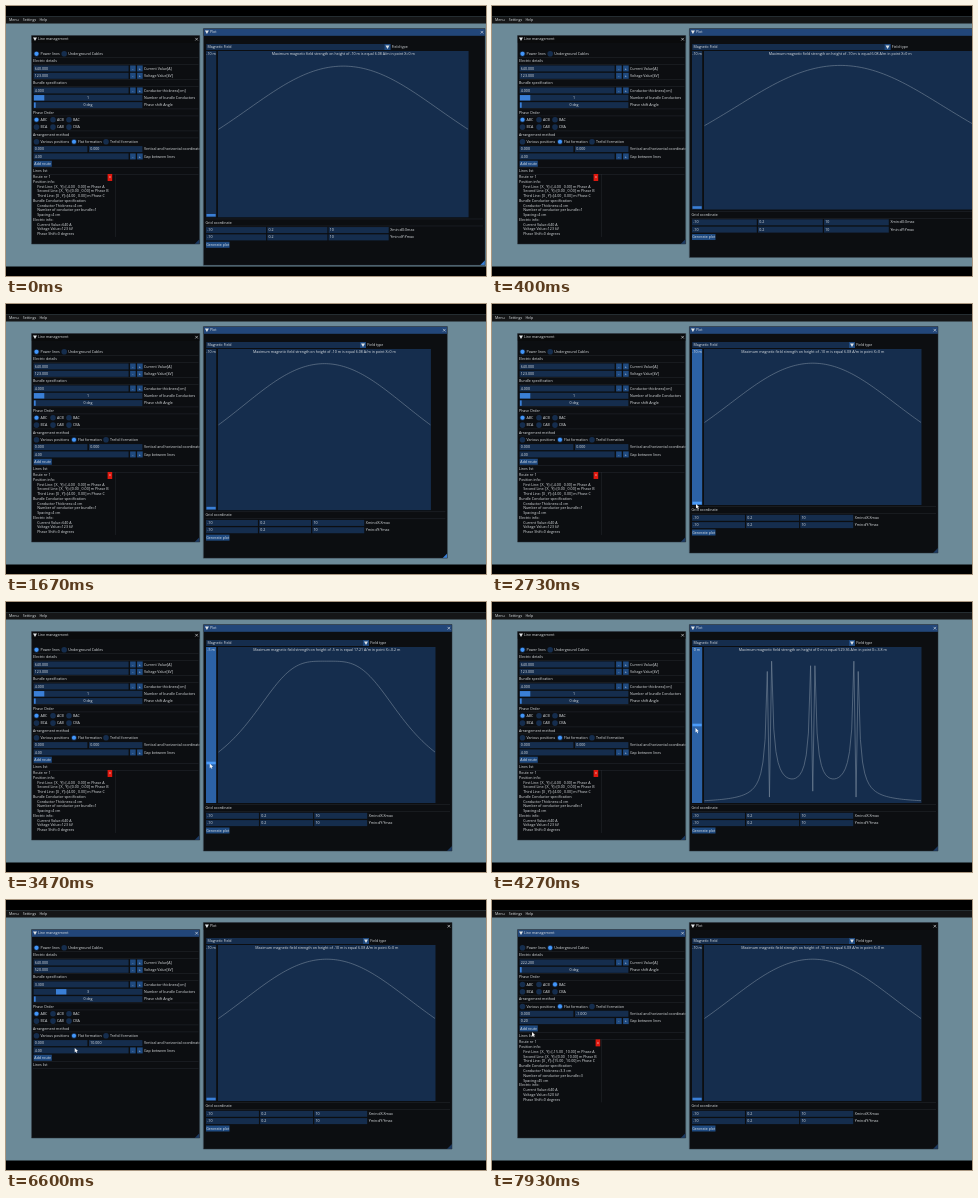
These frames come from a looping animation (480x270 px, 8 s). An HTML page with a canvas:

```html
<!DOCTYPE html>
<html lang="en">
<head>
<meta charset="utf-8">
<title>Line management and field plot</title>
<style>
  html, body { margin: 0; width: 100%; height: 100%; overflow: hidden; background: #000; }
  canvas { display: block; width: 480px; height: 270px; }
</style>
</head>
<body>
<canvas id="stage"></canvas>
<script>
const LOOP = 8000;
const canvas = document.getElementById('stage');
const ctx = canvas.getContext('2d');
const ratio = window.devicePixelRatio || 1;
canvas.width = 480 * ratio;
canvas.height = 270 * ratio;

const C = {
  back: '#6c8a98', menu: '#151617', win: '#0c0e11', edge: '#262c34',
  title: '#0a0b0c', titleOn: '#224679', frame: '#152d4d', button: '#1f4a80',
  hover: '#3276c4', grab: '#3a7fd6', line: '#2b3037', text: '#dfe3e6', curve: '#78889b'
};

// [time, ...values]
const RESIZE = [[0, 479, 259.3], [200, 493, 255], [400, 501, 251.5], [600, 450, 255],
  [800, 390.4, 259.3], [1050, 386, 257], [1700, 444, 254], [2000, 462, 252], [2400, 446, 249]];
const POINTER = [[2400, 446, 249], [2680, 204, 200], [2900, 204, 200], [4000, 203.5, 126],
  [4400, 203.5, 126], [4700, 204, 24], [5000, 204, 214], [5080, 204, 214], [5400, 106, 174],
  [5560, 105, 173], [5700, 60, 71], [5850, 60, 71], [5980, 45, 85], [6120, 45, 85],
  [6230, 52, 92], [6330, 52, 92], [6430, 98, 143], [6540, 98, 143], [6640, 50, 151],
  [6750, 50, 151], [6850, 38, 159], [6980, 38, 159], [7120, 59, 49], [7220, 59, 49],
  [7320, 50, 64], [7420, 50, 64], [7500, 64, 86], [7570, 64, 86], [7640, 98, 115],
  [7710, 98, 115], [7770, 50, 123], [7830, 50, 123], [7920, 40, 132]];

function track(keys, t) {
  if (t <= keys[0][0]) return keys[0].slice(1);
  for (let i = 1; i < keys.length; i++) {
    const [a, b] = [keys[i - 1], keys[i]];
    if (t <= b[0]) {
      const u = (t - a[0]) / (b[0] - a[0]);
      return a.slice(1).map((v, k) => v + (b[k + 1] - v) * u);
    }
  }
  return keys[keys.length - 1].slice(1);
}
const pick = (t, first, ...steps) => steps.reduce((v, [at, next]) => t >= at ? next : v, first);

function rect(x, y, w, h, color) {
  ctx.fillStyle = color;
  ctx.fillRect(x, y, w, h);
}
function text(s, x, y, align = 'left') {
  ctx.fillStyle = C.text;
  ctx.textAlign = align;
  ctx.fillText(s, x, y + 0.15);
}
function shape(color, ...pts) {
  ctx.fillStyle = color;
  ctx.beginPath();
  pts.forEach(p => ctx.lineTo(...p));
  ctx.closePath();
  ctx.fill();
}
function stroke(color, width, ...pts) {
  ctx.strokeStyle = color;
  ctx.lineWidth = width;
  ctx.beginPath();
  pts.forEach(p => ctx.lineTo(...p));
  ctx.stroke();
}
function arrow(x, y) {
  shape(C.text, [x - 2, y - 1.5], [x + 2, y - 1.5], [x, y + 1.9]);
}
function cross(x, y) {
  stroke(C.text, 0.6, [x - 1.3, y - 1.3], [x + 1.3, y + 1.3]);
  stroke(C.text, 0.6, [x + 1.3, y - 1.3], [x - 1.3, y + 1.3]);
}
function openWindow(name, x, y, r, b, active) {
  ctx.save();
  ctx.beginPath();
  ctx.rect(x, y, r - x, b - y);
  ctx.clip();
  rect(x, y, r - x, b - y, C.win);
  rect(x, y, r - x, 7.3, active ? C.titleOn : C.title);
  arrow(x + 3.5, y + 3.6);
  text(name, x + 6.6, y + 3.7);
  cross(r - 3.1, y + 3.7);
}
function closeWindow(x, y, r, b, grip) {
  shape(grip, [r, b], [r - 5, b], [r, b - 5]);
  ctx.restore();
  ctx.strokeStyle = C.edge;
  ctx.lineWidth = 0.5;
  ctx.strokeRect(x, y, r - x, b - y);
}
function heading(s, x, y, r) {
  rect(x, y - 3.7, r - x, 0.4, C.line);
  text(s, x, y);
  rect(x, y + 3.3, r - x, 0.4, C.line);
}
function field(s, x, y, w) {
  rect(x, y - 3, w, 6, C.frame);
  text(s, x + 1.2, y);
}
function button(s, x, y, w, mouse) {
  const over = mouse && mouse[0] >= x && mouse[0] <= x + w && Math.abs(mouse[1] - y) < 3.4;
  rect(x, y - 3, w, 6, over ? C.hover : C.button);
  text(s, x + w / 2, y, 'center');
}
function stepper(value, label, y) {
  field(value, 27.6, y, 95);
  button('-', 124.1, y, 5.6);
  button('+', 131.1, y, 5.6);
  text(label, 138, y);
}
function slider(value, label, y, grabX, grabW) {
  rect(27.6, y - 3, 108.8, 6, C.frame);
  rect(grabX, y - 2.7, grabW, 5.4, C.grab);
  text(value, 82, y, 'center');
  text(label, 138, y);
}
function radios(y, chosen, ...items) {
  for (const [label, x] of items) {
    const dot = (r, color) => {
      ctx.fillStyle = color;
      ctx.beginPath();
      ctx.arc(x, y, r, 0, 7);
      ctx.fill();
    };
    dot(2.8, C.frame);
    if (label === chosen) dot(2.1, '#4296fa');
    text(label, x + 4, y);
  }
}

function routeList(y, gap, height, size, count, spacing, voltage, deleteX) {
  const place = v => `[X , Y]=[${v.toFixed(2)} , ${height}] m Phase `;
  const lines = ['Route nr 1', 'Position info:',
    '  First Line: ' + place(-gap) + 'A', '  Second Line: ' + place(0) + 'B',
    '  Third Line: ' + place(gap) + 'C', 'Bundle Conductor specification:',
    `  Conductor Thickness=${size} cm`, `  Number of conductor per bundle=${count}`,
    `  Spacing=${spacing} cm`, 'Electric info:', '  Current Value=640 A',
    `  Voltage Value=${voltage} kV`, '  Phase Shift=0 degrees'];
  lines.forEach((s, i) => text(s.trim(), s[0] === ' ' ? 31.2 : 27, y + i * 4.76));
  rect(deleteX, y - 3, 4.6, 7, '#e0190f');
  text('x', deleteX + 2.3, y + 0.4, 'center');
  rect(109.3, y - 3, 0.4, 63, C.line);
}

function linePanel(t, mouse) {
  const box = [25.5, 29.5, 193.7, 238];
  openWindow('Line management', ...box, t >= 5400);
  const cables = t >= 7180;
  let y = 47.8 - 7.33;
  const next = () => y += 7.33;
  const head = s => heading(s, 27, next(), 192.5);

  radios(next(), cables ? 'Underground Cables' : 'Power lines',
    ['Power lines', 30.5], ['Underground Cables', 58.2]);
  head('Electric details');
  if (cables) {
    stepper(pick(t, '640.000', [7400, '222.200']), 'Current Value[A]', next());
  } else {
    stepper('640.000', 'Current Value[A]', next());
    stepper(pick(t, '123.000', [5800, '520.000']), 'Voltage Value[kV]', next());
    head('Bundle specification');
    stepper(pick(t, '4.000', [6080, '3.300']), 'Conductor thickness[cm]', next());
    const many = t >= 6280;
    slider(many ? '3' : '1', 'Number of bundle Conductors', next(), many ? 50 : 27.9, 10.4);
  }
  slider('0 deg', 'Phase shift Angle', next(), 27.9, 1.8);

  head('Phase Order');
  const order = cables && t >= 7540 ? 'BAC' : 'ABC';
  radios(next(), order, ['ABC', 30.5], ['ACB', 47], ['BAC', 63]);
  radios(next(), order, ['BCA', 30.5], ['CAB', 47], ['CBA', 63]);
  head('Arrangement method');
  radios(next(), 'Flat formation', ['Various positions', 30.5],
    ['Flat formation', 68], ['Trefoil formation', 100]);
  next();
  field('0.000', 27.6, y, 53.8);
  field(cables ? pick(t, '0.000', [7690, '-1.000']) : pick(t, '0.000', [6500, '10.000']), 83, y, 53.4);
  text('Vertical and horizontal coordinates', 138, y);
  stepper(cables ? pick(t, '4.00', [7810, '0.20']) : pick(t, '4.00', [6720, '15.00']),
    'Gap between lines', next());
  button('Add route', 27.6, next(), 18.2, mouse);
  head('Lines list');

  if (t < 5540) routeList(y + 5.9, 4, '0.00', '4', 1, 4, 123, 101.6);
  else if (t >= 6920) routeList(y + 6.6, 15, '10.00', '3.3', 3, 45, 520, 103.6);
  closeWindow(...box, '#1b3a63');
}

// Flat three-phase line with conductors at -4, 0 and 4 m, 120 degrees apart.
// The peak over time is the long half-axis of the field ellipse.
function fieldStrength(x, h) {
  let xr = 0, xi = 0, yr = 0, yi = 0;
  for (const k of [-1, 0, 1]) {
    const dx = x - 4 * k, rr = dx * dx + h * h;
    if (rr < 1e-6) continue;
    const re = Math.cos(k * 2 * Math.PI / 3) / rr, im = Math.sin(k * 2 * Math.PI / 3) / rr;
    xr += h * re;
    xi += h * im;
    yr += dx * re;
    yi += dx * im;
  }
  const sum = xr * xr + xi * xi + yr * yr + yi * yi;
  const spread = Math.hypot(xr * xr - xi * xi + yr * yr - yi * yi, 2 * (xr * xi + yr * yi));
  return 640 / (2 * Math.PI) * Math.sqrt((sum + spread) / 2);
}

function plotPanel(t, mouse) {
  const [right, bottom] = track(RESIZE, t);
  const box = [197.4, 22.5, right, bottom];
  const width = right - 198, base = bottom - 48, end = right - 16.5, top = 45;
  const dragging = t >= 2720 && t < 5060;
  openWindow('Plot', ...box, t < 5400);

  const wide = 0.65 * width;
  const comboEnd = 201.8 + wide;
  field('Magnetic Field', 200.2, 41, comboEnd - 200.2);
  rect(comboEnd - 6, 38, 6, 6, C.button);
  arrow(comboEnd - 3, 41);
  text('Field type', 203 + wide, 41);

  const grabTravel = base - top - 4;
  let h = -10;
  if (dragging) {
    h = Math.round((base - 1.8 - mouse[1]) / grabTravel * 20) - 10;
    h = Math.max(-10, Math.min(10, h));
  }
  const over = mouse && mouse[0] > 200 && mouse[0] < 210 && mouse[1] < base;
  rect(200, top, 10.2, base - top, dragging ? '#2c62a6' : over ? '#25528b' : C.frame);
  rect(200.5, base - 3.3 - (h + 10) / 20 * grabTravel, 9.2, 2.6, dragging ? '#4b9bf8' : C.grab);
  text(`${h} m`, 205, 48, 'center');

  rect(212, top, end - 212, base - top, C.frame);
  const xs = Array.from({ length: 101 }, (_, i) => (i - 50) / 5);
  const values = xs.map(x => fieldStrength(x, h));
  let best = 0;
  values.forEach((v, i) => { if (v > values[best] + 1e-6) best = i; });
  const peak = values[best];
  stroke(C.curve, 0.6, ...values.map((v, i) => [
    212.5 + i / 100 * (end - 213),
    base - v / (peak * 1.1) * (base - top)
  ]));
  text(`Maximum magnetic field strength on height of ${h} m is equal ${peak.toFixed(2)} A/m in point X=${xs[best]} m`,
    (212 + end) / 2, 48, 'center');

  heading('Grid coordinate', 199.5, base + 5.2, right - 2);
  const cell = (wide - 2.4) / 3;
  ['X', 'Y'].forEach((axis, row) => {
    const y = base + 12.8 + row * 7.3;
    ['-10', '0.2', '10'].forEach((s, i) => field(s, 200 + i * (cell + 1.2), y, cell));
    text(`${axis}min:d${axis}:${axis}max`, 201.6 + wide, y);
  });
  button('Generate plot', 200, base + 27.5, 23.5);
  closeWindow(...box, t < 2420 ? '#3a80d8' : '#1b3a63');
}

function pointer([x, y]) {
  shape('#f4f4f4', [x, y], [x, y + 4.6], [x + 1.1, y + 3.6], [x + 1.9, y + 5.2],
    [x + 2.6, y + 4.9], [x + 1.9, y + 3.3], [x + 3.3, y + 3.2]);
}

function draw(t) {
  ctx.setTransform(ratio, 0, 0, ratio, 0, 0);
  ctx.font = '3.6px "Open Sans", "Noto Sans", sans-serif';
  ctx.textBaseline = 'middle';
  ctx.lineJoin = 'round';
  rect(0, 0, 480, 270, '#000');
  rect(0, 10.5, 480, 250, C.back);
  rect(0, 10.5, 480, 7, C.menu);
  text('Menu', 3, 14.2);
  text('Settings', 16.8, 14.2);
  text('Help', 33.4, 14.2);
  const mouse = t >= 2420 ? track(POINTER, t) : null;
  linePanel(t, mouse);
  plotPanel(t, mouse);
  if (mouse) pointer(mouse);
}

const start = performance.now();
function tick() {
  draw((performance.now() - start) % LOOP);
  requestAnimationFrame(tick);
}
tick();
</script>
</body>
</html>
```
